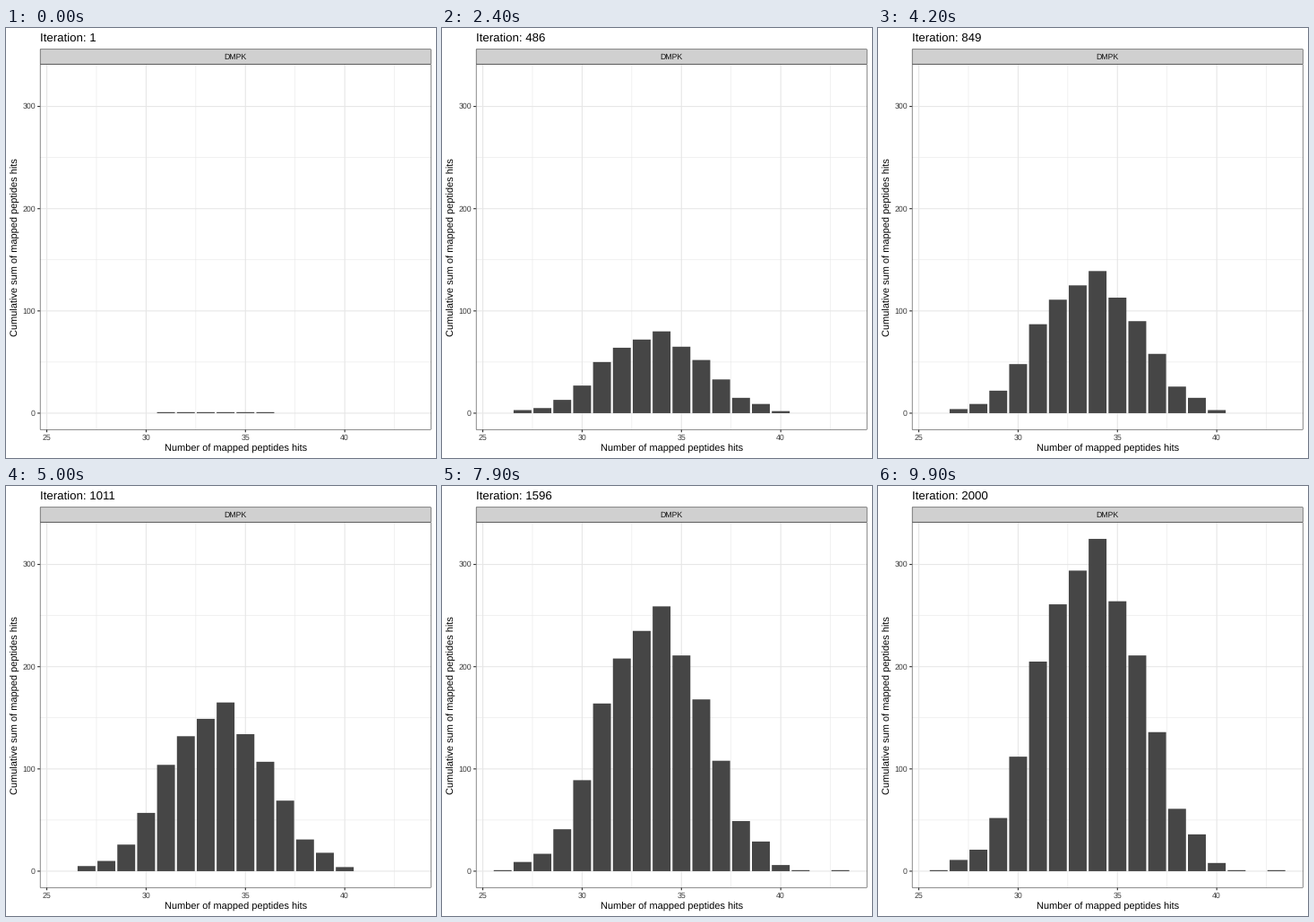
Recreate the animation shown at these times as a matplotlib script. Size 480x480 px, loop 10000 ms.

```python
import matplotlib.pyplot as plt
from matplotlib.animation import FuncAnimation
from matplotlib.patches import Rectangle

plt.rcParams["font.family"] = "Liberation Sans"
plt.rcParams["text.hinting"] = "none"

FRAMES, LAST_ITER = 100, 2000
LEFT, RIGHT, TOP, BOTTOM = 37.9, 474.5, 40.5, 448.5
STRIP_TOP = 23.5
MID = (LEFT + RIGHT) / 2
X_MIN, X_MAX = 24.655, 44.345
Y_MIN, Y_MAX = -16.25, 341.25
BAR, GRID, STRIP, EDGE, TICK_TEXT = "#464646", "#e6e6e6", "#d0d0d0", "#262626", "#3c3c3c"
LINE = 1.07

# Final histogram, starting at the value 26; every bar grows towards it
FIRST = 26
FINAL = [1, 11, 21, 52, 112, 205, 261, 294, 325,
         264, 211, 136, 61, 36, 8, 1, 0, 1]
HEAD_START = 9


def px(x):
    return LEFT + (x - X_MIN) / (X_MAX - X_MIN) * (RIGHT - LEFT)


def py(y):
    return BOTTOM - (y - Y_MIN) / (Y_MAX - Y_MIN) * (BOTTOM - TOP)


def count(final, iteration):
    share = (iteration + HEAD_START) / (LAST_ITER + HEAD_START)
    return int(final * share + 0.3)


fig = plt.figure(figsize=(20 / 3, 20 / 3), dpi=72, facecolor="white")
ax = fig.add_axes([0, 0, 1, 1])
ax.set_xlim(0, 480)
ax.set_ylim(480, 0)
ax.axis("off")


def line(xs, ys, color, width, z):
    ax.plot(xs, ys, color=color, lw=width, zorder=z, snap=False,
            solid_capstyle="butt")


def box(top, bottom, fill):
    """Framed area whose border lies fully inside its edges."""
    inset = LINE / 4
    ax.add_patch(Rectangle(
        (LEFT + inset, top + inset), RIGHT - LEFT - 2 * inset,
        bottom - top - 2 * inset, fc=fill, ec=EDGE, lw=LINE / 2,
        joinstyle="miter", zorder=5, snap=False))


def label(x, y, text, size, color="black", ha="center", **kw):
    return ax.text(x, y, text, fontsize=size, color=color, ha=ha,
                   va="baseline", zorder=6, **kw)


def grid_x(x, width):
    line([px(x)] * 2, [TOP, BOTTOM], GRID, width, 1)


def grid_y(y, width):
    line([LEFT, RIGHT], [py(y)] * 2, GRID, width, 1)


for x in range(25, 45, 5):
    grid_x(x + 2.5, LINE / 2)
    grid_x(x, LINE)
    line([px(x)] * 2, [BOTTOM, BOTTOM + 2.75], EDGE, LINE, 4)
    label(px(x), 460, str(x), 8.8, TICK_TEXT)
for y in range(0, 400, 100):
    if y + 50 < Y_MAX:
        grid_y(y + 50, LINE / 2)
    grid_y(y, LINE)
    line([LEFT - 2.75, LEFT], [py(y)] * 2, EDGE, LINE, 4)
    label(LEFT - 4.95, py(y) + 2.8, str(y), 8.8, TICK_TEXT, "right")

box(TOP, BOTTOM, "none")
box(STRIP_TOP, TOP, STRIP)
label(MID, 35, "DMPK", 8.8, "#141414")
label(MID, 473, "Number of mapped peptides hits", 11)
label(14, (TOP + BOTTOM) / 2, "Cumulative sum of mapped peptides hits", 11,
      rotation=90, rotation_mode="anchor")
title = label(LEFT, 15, "", 13.2, ha="left")

bars = [ax.add_patch(Rectangle((px(FIRST + k - 0.45), py(0)),
                               px(0.9) - px(0), 0, fc=BAR, lw=0,
                               zorder=3, snap=False))
        for k in range(len(FINAL))]


def update(i):
    iteration = int(1 + i * (LAST_ITER - 1) / (FRAMES - 1) + 0.5)
    title.set_text(f"Iteration: {iteration}")
    for bar, final in zip(bars, FINAL):
        n = count(final, iteration)
        bar.set_visible(n > 0)
        bar.set_height(py(n) - py(0))
    return [title, *bars]


anim = FuncAnimation(fig, update, frames=FRAMES, interval=100, repeat=True,
                     repeat_delay=0, blit=False)
plt.show()
```
